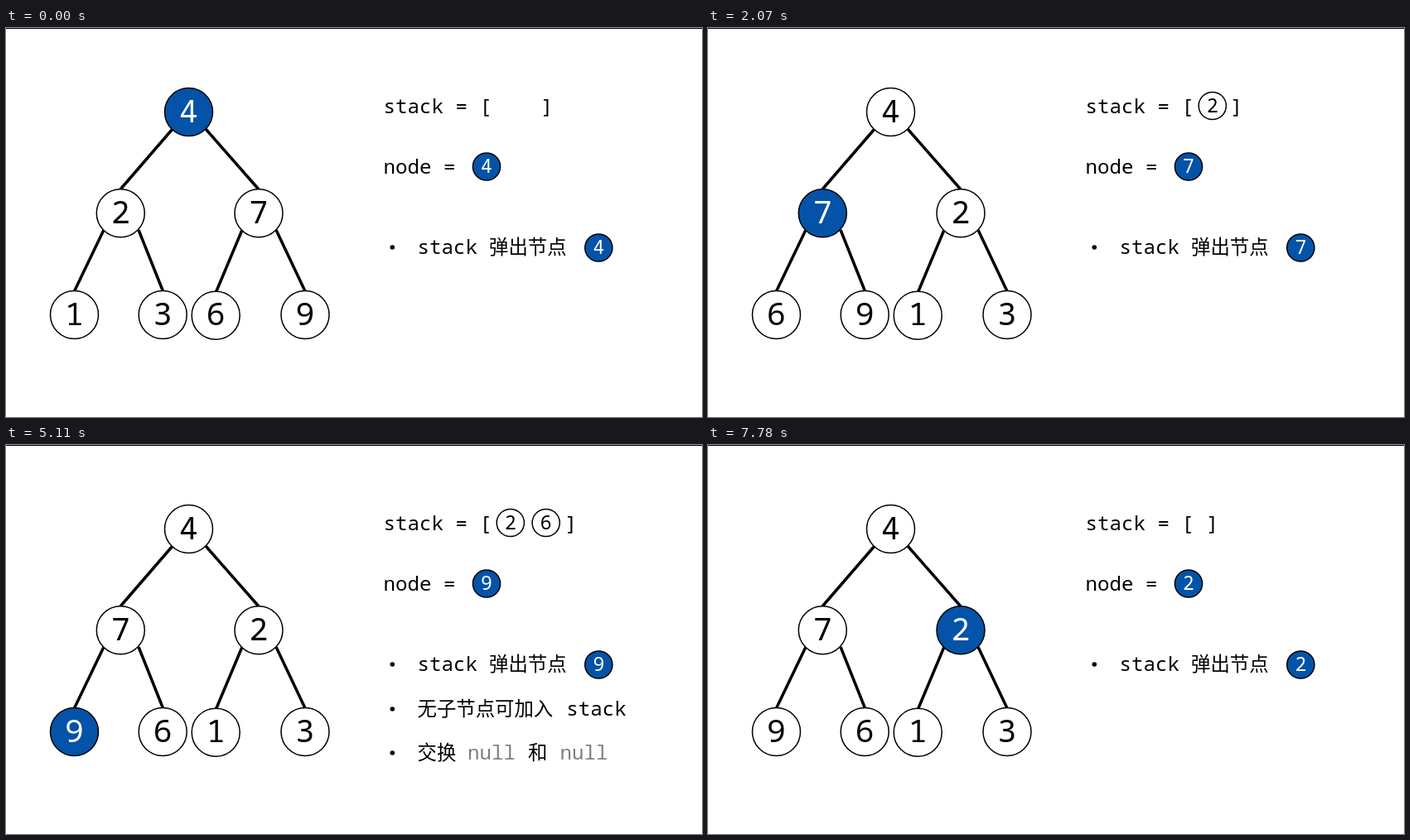
An HTML page for the animation above (8000 ms loop, 840 by 470 pixels).

```html
<!DOCTYPE html>
<html lang="zh-CN">
<head>
<meta charset="utf-8">
<title>Invert a binary tree with a stack</title>
<style>
  html, body { margin: 0; width: 100%; height: 100%; overflow: hidden; background: #fff; }
  svg { display: block; width: 840px; height: 470px; }
  text { font-family: "Noto Sans Mono", "Noto Sans CJK SC", "Noto Sans CJK", monospace; font-size: 24.15px; white-space: pre; }
  .han { font-family: "Noto Sans CJK SC", "Noto Sans CJK", sans-serif; font-size: 23.4px; }
  .big { font-size: 38px; }
  .small { font-size: 23px; }
  .mid { text-anchor: middle; }
  .ring { stroke: #000; stroke-width: 1.5; }
  .edge { stroke: #000; stroke-width: 3.5; fill: none; }
  .scene { visibility: hidden; animation: 8s step-end infinite; }
</style>
</head>
<body>
<svg id="stage" viewBox="0 0 840 470">
  <rect width="840" height="1"/>
  <path class="edge" d="M201 122L138 195M241 122L305 195M118 244L82.5 318M160 244L189.5 318M285 244L253.5 319M326 244L361 318"/>
</svg>
<script>
const LOOP = 8000;
const FILL = { w: '#fff', b: '#0453a8', t: '#9de3da', p: '#f2bbaf' };
const SPOTS = [[220.5, 101.5], [138.3, 223.7], [305, 223.7], [82.5, 346.5], [189.2, 346.5], [253.2, 347.3], [361, 346.5]];
const LINE_Y = [273, 327, 380];

const text = (x, y, str, cls = '', fill = '#000') =>
  `<text x="${x}" y="${y}" class="${cls}" fill="${fill}">${str}</text>`;

// A token is a digit followed by its colour key, e.g. "4b".
const disc = (x, y, [digit, key], big) =>
  `<circle class="ring" cx="${x}" cy="${y}" r="${big ? 29 : 16.6}" fill="${FILL[key]}"/>` +
  text(x, y + (big ? 12 : 7.8), digit, `mid ${big ? 'big' : 'small'}`, key === 'b' ? '#fff' : '#000');

const bullet = i => `<circle cx="466.3" cy="${LINE_Y[i] - 8}" r="2.8"/>`;

const popLine = node => bullet(0) + text(496.5, LINE_Y[0], 'stack') +
  text(583, LINE_Y[0], '弹出节点', 'han') + disc(715.3, 265.5, node);

const pushLine = ([a, b]) => bullet(1) + text(496.5, LINE_Y[1], '将', 'han') +
  disc(550.7, 319.2, a) + disc(592.7, 319.2, b) +
  text(629, LINE_Y[1], '加入', 'han') + text(691, LINE_Y[1], 'stack');

const swapLine = ([a, b]) => bullet(2) + text(496.5, LINE_Y[2], '交换', 'han') +
  disc(581.3, 372.5, a) + text(618, LINE_Y[2], '和', 'han') + disc(675, 372.5, b);

const leafLines = () => bullet(1) + text(496.5, LINE_Y[1], '无子节点可加入', 'han') +
  text(676.3, LINE_Y[1], 'stack') + bullet(2) + text(496.5, LINE_Y[2], '交换', 'han') +
  text(557, LINE_Y[2], 'null', '', '#7f7f7f') + text(630, LINE_Y[2], '和', 'han') +
  text(668.5, LINE_Y[2], 'null', '', '#7f7f7f');

function scene({ tree, stack, close, node, extra = '' }) {
  return tree.split(' ').map((n, i) => disc(...SPOTS[i], n, true)).join('') +
    text(455.6, 103, 'stack = [') +
    stack.map((n, i) => disc(608.8 + i * 42.9, 94, n)).join('') +
    text(close, 103, ']', 'mid') +
    text(455.6, 175.5, 'node =') + disc(580, 167.5, node) +
    popLine(node) + extra;
}

const pair1 = ['2t', '7p'], pair2 = ['6t', '9p'];
const scenes = [
  { at: 0, tree: '4b 2w 7w 1w 3w 6w 9w', stack: [], close: 653, node: '4b' },
  { at: 80, tree: '4b 2t 7p 1w 3w 6w 9w', stack: pair1, close: 682, node: '4b', extra: pushLine(pair1) },
  { at: 1090, tree: '4b 7p 2t 6w 9w 1w 3w', stack: pair1, close: 682, node: '4b', extra: pushLine(pair1) + swapLine(pair1) },
  { at: 2070, tree: '4w 7b 2w 6w 9w 1w 3w', stack: ['2w'], close: 638, node: '7b' },
  { at: 3080, tree: '4w 7b 2w 6t 9p 1w 3w', stack: ['2w', ...pair2], close: 725.5, node: '7b', extra: pushLine(pair2) },
  { at: 4090, tree: '4w 7b 2w 9p 6t 1w 3w', stack: ['2w', ...pair2], close: 725.5, node: '7b', extra: pushLine(pair2) + swapLine(pair2) },
  { at: 5110, tree: '4w 7w 2w 9b 6w 1w 3w', stack: ['2w', '6w'], close: 682, node: '9b', extra: leafLines() },
  { at: 6120, tree: '4w 7w 2w 9w 6b 1w 3w', stack: ['2w'], close: 638, node: '6b', extra: leafLines() },
  { at: 7090, tree: '4w 7w 2b 9w 6w 1w 3w', stack: [], close: 609, node: '2b' }
];

const pct = ms => ms / LOOP * 100 + '%';
let css = '', body = '';
scenes.forEach((s, i) => {
  const end = scenes[i + 1]?.at ?? LOOP;
  css += `@keyframes scene${i}{0%{visibility:hidden}${pct(s.at)}{visibility:visible}${pct(end)}{visibility:hidden}100%{visibility:hidden}}`;
  body += `<g class="scene" style="animation-name:scene${i}">${scene(s)}</g>`;
});
document.head.insertAdjacentHTML('beforeend', `<style>${css}</style>`);
document.getElementById('stage').insertAdjacentHTML('beforeend', body);
</script>
</body>
</html>
```
